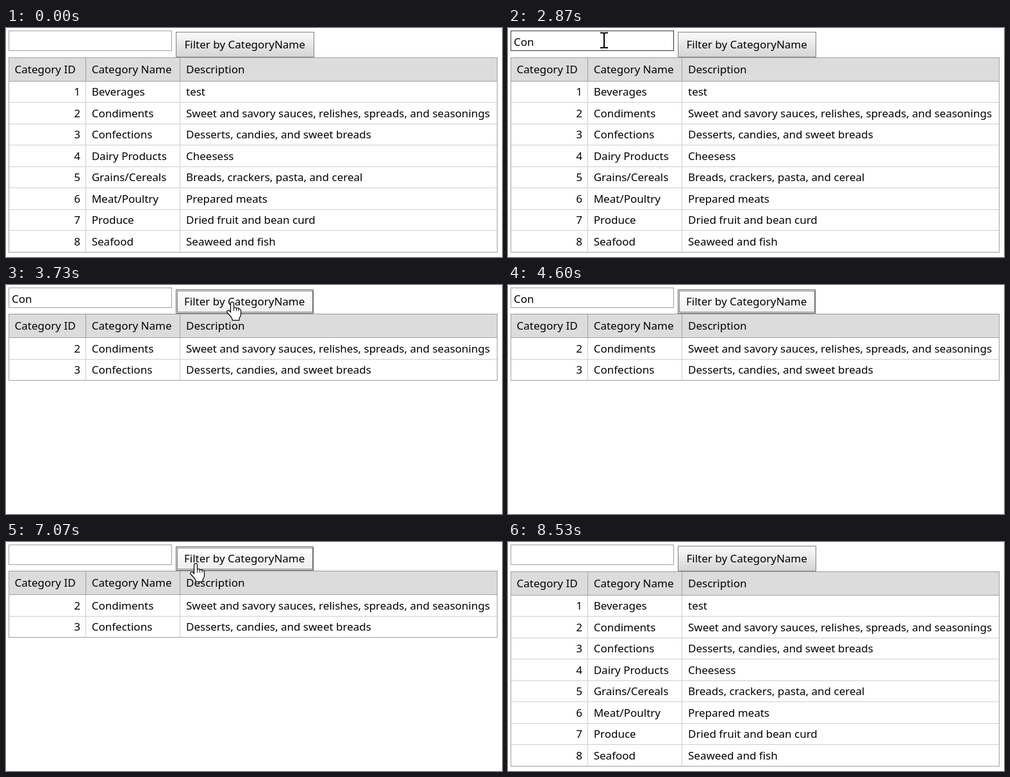
Recreate the animation shown at these times as an HTML page. Size 774 by 359 pixels, loop 8670 ms.

```html
<!DOCTYPE html>
<html lang="en">
<head>
<meta charset="utf-8">
<title>Grid filter</title>
<style>
  html, body { margin: 0; width: 100%; height: 100%; overflow: hidden; background: #fff; }
  svg { display: block; width: 774px; height: 359px; }
  text { font: 17px "Noto Sans", "Open Sans", sans-serif; fill: #000; }
</style>
</head>
<body>
<svg id="stage" viewBox="0 0 774 359"></svg>
<script>
const LOOP = 8670, STEP = 1000 / 15, ROW = 33.5;
const LINE = '#9f9f9f', INNER = '#cfcfcf';
const LABEL = 'Filter by CategoryName';
const COLUMNS = [13.6, 133.7, 281];
const stage = document.getElementById('stage');

const categories = [
  ['Beverages', 'test'],
  ['Condiments', 'Sweet and savory sauces, relishes, spreads, and seasonings'],
  ['Confections', 'Desserts, candies, and sweet breads'],
  ['Dairy Products', 'Cheesess'],
  ['Grains/Cereals', 'Breads, crackers, pasta, and cereal'],
  ['Meat/Poultry', 'Prepared meats'],
  ['Produce', 'Dried fruit and bean curd'],
  ['Seafood', 'Seaweed and fish']
].map(([name, description], i) => ({ id: i + 1, name, description }));

// Pointer waypoints: time, x, y
const path = [
  [200, 129, 298], [600, 123, 30], [667, 128, 21], [2600, 128, 21],
  [2667, 135, 20], [2733, 143, 19], [2800, 143, 19], [3400, 353, 26],
  [4333, 353, 26], [4600, 372, 25], [6467, 128, 21], [6530, 136, 21],
  [6933, 296, 33], [7733, 296, 33], [8333, 42, 358]
];

const within = (t, from, to) => t >= from && t < to;
const fill = (x, y, w, h, color) =>
  `<rect x="${x}" y="${y}" width="${w}" height="${h}" fill="${color}"/>`;
const box = (x, y, w, h, color, stroke, extra = '') =>
  `<rect x="${x + .5}" y="${y + .5}" width="${w - 1}" height="${h - 1}" fill="${color}" stroke="${stroke}" ${extra}/>`;
const text = (x, y, string, extra = '') => `<text x="${x}" y="${y}" ${extra}>${string}</text>`;
const shape = (d, extra) => `<path d="${d}" ${extra}/>`;

const gradient = (id, top, bottom) =>
  `<linearGradient id="${id}" x2="0" y2="1"><stop stop-color="${top}"/><stop offset="1" stop-color="${bottom}"/></linearGradient>`;
const defs = `<defs>${gradient('plain', '#fbfbfb', '#d4d4d4')}${gradient('active', '#ffffff', '#eeeeee')}</defs>`;

const outline = 'fill="#fff" stroke="#000" stroke-width="1.2" stroke-linejoin="round"';
const pointers = {
  arrow: shape('M0 0V20.5L4.7 16.2 7.8 23 11 21.6 8 15H14.6Z', outline),
  beam: shape('M-6-11.5H-2.5Q0-11.5 0-9.5Q0-11.5 2.5-11.5H6M0-10V10.5M-6 12H-2.5Q0 12 0 10Q0 12 2.5 12H6',
    'fill="none" stroke="#000" stroke-width="2"'),
  hand: shape('M-2.5 17V3Q-2.5.7 0 .7T2.5 3V11Q2.7 9 4.6 9T6.5 11.5Q6.7 10 8.5 10T10 12.5Q10.2 11.2 11.6 11.5T13.5 14V20Q13.5 23 11 26V29.3H0V27Q-1 24.5-4 21.5L-8 17Q-9 14.5-6.5 14T-2.5 17Z', outline) +
    shape('M2.5 11V15M6.5 12V15M10 13V15', 'fill="none" stroke="#000" stroke-width=".9"')
};

function pointerAt(t) {
  if (!within(t, 200, 4600) && !within(t, 6530, 8330)) return null;
  const time = Math.floor((t + 4) / STEP) * STEP;
  const next = path.findIndex(p => p[0] > time);
  const a = path[Math.max(0, next - 1)], b = path[next < 0 ? path.length - 1 : next];
  const u = Math.min(1, Math.max(0, (time - a[0]) / (b[0] - a[0] || 1)));
  const ease = u * u * (3 - 2 * u);
  const x = Math.round(a[1] + (b[1] - a[1]) * ease);
  const y = Math.round(a[2] + (b[2] - a[2]) * ease);
  const overInput = x >= 4 && x < 259 && y >= 4 && y < 36;
  const overButton = x >= 265 && x < 481 && y >= 6 && y < 46;
  return { x, y, kind: overInput ? 'beam' : overButton ? 'hand' : 'arrow' };
}

function drawInput(t) {
  const focused = within(t, 1130, 3400) || within(t, 4930, 7000);
  const value = t < 1870 || t >= 5930 ? '' : t < 2000 ? 'C' : t < 2200 ? 'Co' : 'Con';
  const caretX = [10, 20, 30, 40][value.length];
  const caret = within(t, 1130, 1600) || within(t, 1870, 2670) ||
    within(t, 4930, 5200) || within(t, 5930, 6530);
  const selectFrom = within(t, 5200, 5270) ? 20 : within(t, 5270, 5930) ? 10 : 0;
  let out = box(4, 4, 255, 32, '#fff', focused ? '#333' : LINE);
  if (selectFrom) out += fill(selectFrom, 10, 40 - selectFrom, 22, '#0078d7');
  if (selectFrom === 20) {
    out += text(9, 28, 'C<tspan fill="#fff">on</tspan>');
  } else {
    out += text(9, 28, value, selectFrom ? 'style="fill:#fff"' : '');
  }
  return out + (caret ? fill(caretX, 10, 1, 22, '#000') : '');
}

function drawButton(focused, hovered) {
  const paint = hovered ? '#d4d6d4' : focused ? 'url(#active)' : 'url(#plain)';
  if (!focused) return box(265, 6, 216, 40, paint, '#7f7f7f') + text(278.5, 32, LABEL);
  return box(265, 7, 215, 38, paint, hovered ? '#7f7f7f' : '#5f5f5f') +
    box(267, 9, 212, 34, 'none', '#000', 'stroke-dasharray="1 1" stroke-dashoffset=".5" shape-rendering="crispEdges"') +
    text(278, 32, LABEL);
}

function drawTable(rows, shift) {
  const snap = y => Math.floor(y + shift);
  const top = snap(46.3), head = snap(83.3), bottom = snap(83.3 + ROW * rows.length);
  let out = fill(4, top, 763, head - top, '#dcdcdc');
  ['Category ID', 'Category Name', 'Description'].forEach((title, i) => {
    out += text(COLUMNS[i], snap(71.4), title);
  });
  rows.forEach((row, i) => {
    const y = snap(106.6 + ROW * i);
    out += text(116, y, row.id, 'text-anchor="end"') +
      text(COLUMNS[1], y, row.name) + text(COLUMNS[2], y, row.description);
    if (i) out += fill(5, snap(83.3 + ROW * i), 761, 1, INNER);
  });
  for (const x of [124, 271]) {
    out += fill(x, top, 1, head - top, LINE) + fill(x, head, 1, bottom - head, INNER);
  }
  return out + fill(4, head, 763, 1, LINE) + box(4, top, 763, bottom - top + 1, 'none', LINE);
}

function render(t) {
  const pointer = pointerAt(t);
  const focused = within(t, 3530, 4930) || within(t, 7070, 8530);
  const held = within(t, 3530, 4400) || within(t, 7070, 7800);
  const hovered = !held && pointer !== null && pointer.kind === 'hand';
  const rows = within(t, 3730, 7270) ? categories.filter(c => c.name.startsWith('Con')) : categories;
  return defs + drawTable(rows, focused ? -.5 : 0) + drawInput(t) + drawButton(focused, hovered) +
    (pointer ? `<g transform="translate(${pointer.x} ${pointer.y})">${pointers[pointer.kind]}</g>` : '');
}

let shown = '';
const start = performance.now();
function tick() {
  const markup = render((performance.now() - start) % LOOP);
  if (markup !== shown) stage.innerHTML = shown = markup;
  requestAnimationFrame(tick);
}
tick();
</script>
</body>
</html>
```
